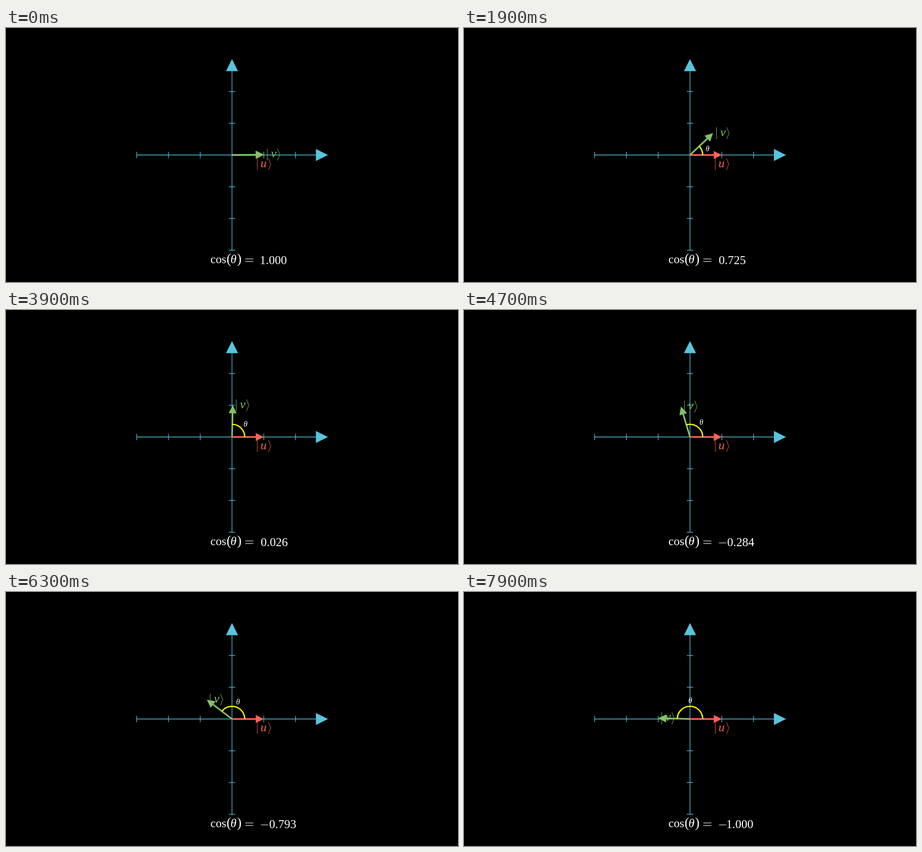
Write an HTML page with a canvas that moves like this. It is 960 px wide and 540 px high and loops after 8 s.

```html
<!DOCTYPE html>
<html lang="en">
<head>
<meta charset="utf-8">
<title>Cosine of the angle between two vectors</title>
<style>
html, body { margin: 0; width: 100%; height: 100%; overflow: hidden; background: #000; }
canvas { display: block; }
</style>
</head>
<body>
<canvas width="960" height="540"></canvas>
<script>
const ctx = document.querySelector('canvas').getContext('2d');
const UNIT = 67.5, CX = 480, CY = 270, LOOP = 8000, STEP = 100;
const BLUE = '#58c4dd', RED = '#fc6255', GREEN = '#83c167', YELLOW = '#ffff00', WHITE = '#fff';
const SERIF = '"Liberation Serif", "Noto Serif", serif';

function stroke(color, width, ...points) {
  ctx.strokeStyle = color;
  ctx.lineWidth = width;
  ctx.beginPath();
  points.forEach(([x, y]) => ctx.lineTo(x, y));
  ctx.stroke();
}

// A head pointing right, from its tip backwards
function head(color, tip, length, half) {
  ctx.fillStyle = color;
  ctx.beginPath();
  ctx.moveTo(tip, 0);
  ctx.lineTo(tip - length, -half);
  ctx.lineTo(tip - length, half);
  ctx.fill();
}

function turned(angle, draw) {
  ctx.save();
  ctx.translate(CX, CY);
  ctx.rotate(-angle);
  draw();
  ctx.restore();
}

// Text whose inked left edge sits at x
function text(str, x, y, size, color = WHITE, style = '') {
  ctx.font = `${style} ${size}px ${SERIF}`;
  ctx.fillStyle = color;
  ctx.fillText(str, x + ctx.measureText(str).actualBoundingBoxLeft, y);
}

function centred(str, x, y, size) {
  ctx.font = `italic ${size}px ${SERIF}`;
  ctx.fillStyle = WHITE;
  const m = ctx.measureText(str);
  ctx.fillText(str, x + (m.actualBoundingBoxLeft - m.actualBoundingBoxRight) / 2,
    y + (m.actualBoundingBoxAscent - m.actualBoundingBoxDescent) / 2);
}

function axis(angle) {
  turned(angle, () => {
    stroke(BLUE, 1.35, [-3 * UNIT, 0], [2.65 * UNIT, 0]);
    for (const n of [-3, -2, -1, 1, 2]) stroke(BLUE, 1.35, [n * UNIT, -6.75], [n * UNIT, 6.75]);
    head(BLUE, 204, 25.8, 12.8);
  });
}

function vector(color, angle) {
  turned(angle, () => {
    stroke(color, 3.4, [0, 0], [0.76 * UNIT, 0]);
    head(color, UNIT, 17, 8.5);
  });
}

function ket(letter, color, x, y, width) {
  stroke(color, 1, [x, y - 12.5], [x, y + 12.5]);
  text(letter, x + 7.8, y + 6.2, 26, color, 'italic');
  const end = x + width;
  stroke(color, 1, [end - 5, y - 12.5], [end, y], [end - 5, y + 12.5]);
}

function readout(angle) {
  text('cos', 434.3, 500.4, 25.2);
  text('(', 469.5, 500.4, 28.5);
  text('θ', 477.8, 500.4, 26, WHITE, 'italic');
  text(')', 490.8, 500.4, 28.5);
  ctx.fillRect(508.3, 490.4, 17, 1.1);
  ctx.fillRect(508.3, 496, 17, 1.1);
  const value = Math.cos(angle);
  if (value < 0) ctx.fillRect(541.5, 494.6, 15.6, 1.1);
  text(Math.abs(value).toFixed(3), value < 0 ? 559 : 541, 502.2, 25.5);
}

function draw(now) {
  const t = Math.floor((now % LOOP) / STEP) * STEP;
  const angle = Math.PI * (t + STEP / 3) / LOOP;
  ctx.fillStyle = '#000';
  ctx.fillRect(0, 0, 960, 540);

  axis(0);
  axis(Math.PI / 2);
  vector(RED, 0);
  vector(GREEN, angle);

  if (t > 0) {
    ctx.strokeStyle = YELLOW;
    ctx.lineWidth = 2.7;
    ctx.beginPath();
    ctx.arc(CX, CY, 0.4 * UNIT, 0, -angle, true);
    ctx.stroke();
    centred('θ', CX + 40 * Math.cos(angle / 2), CY + 0.4 - 40 * Math.sin(angle / 2), 16.5);
  }

  ket('u', RED, 533.8, 289.4, 28.6);
  ket('v', GREEN, CX + UNIT * Math.cos(angle) + 7.4, CY - UNIT * Math.sin(angle), 26.6);
  readout(angle);
}

function tick() {
  draw(performance.now());
  requestAnimationFrame(tick);
}
tick();
</script>
</body>
</html>
```
